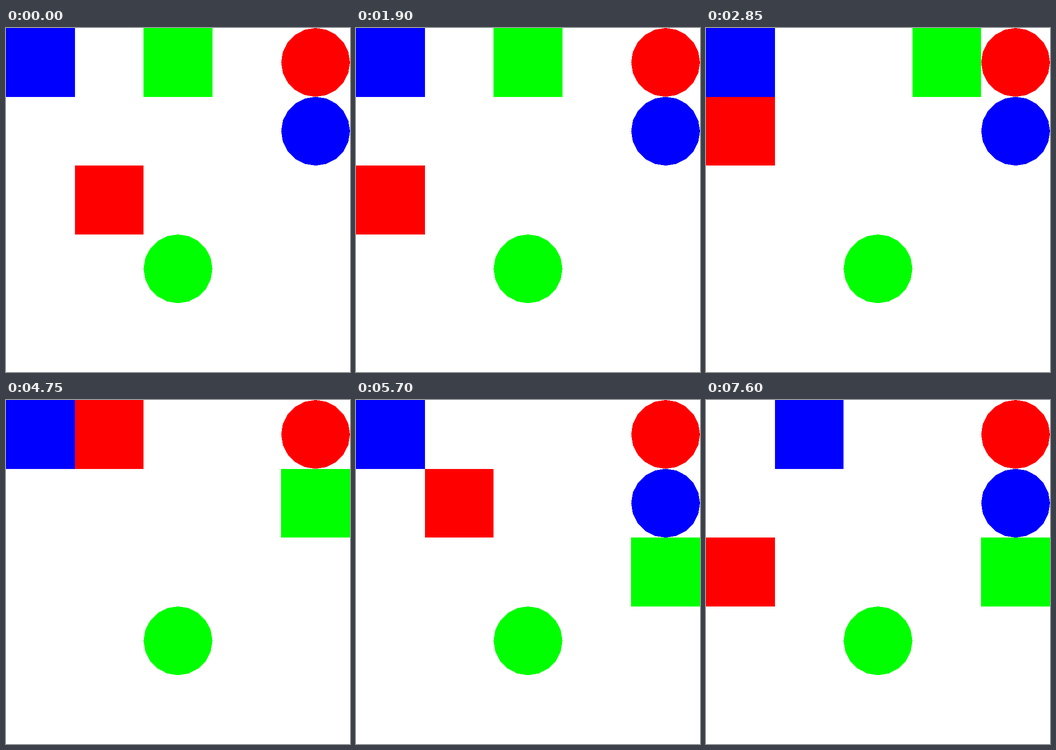
An HTML page for the animation above (8000 ms loop, 748 px wide and 748 px high).

```html
<!DOCTYPE html>
<html>
<head>
<meta charset="utf-8">
<style>
  html, body { margin: 0; width: 100%; height: 100%; overflow: hidden; background: #fff; }
  svg { display: block; width: 748px; height: 748px; shape-rendering: crispEdges; }
</style>
</head>
<body>
<svg id="stage" viewBox="0 0 748 748"></svg>
<script>
const CELL = 748 / 5, STEP = 950, LOOP = 8000;
const stage = document.getElementById('stage');

// Each goal: colour, column, row
const goals = [['#f00', 4, 0], ['#00f', 4, 1], ['#0f0', 2, 3]];

// Each agent: colour and its column-row cell at every step
const agents = [
  ['#f00', '12 02 02 01 11 10 11 01 02'],
  ['#0f0', '20 20 20 30 31 41 42 41 42'],
  ['#00f', '00 01 00 00 01 00 00 10 10'],
].map(([fill, path]) => ({ path: path.split(' '), node: add('rect', { fill, width: CELL, height: CELL }) }));

function add(tag, attributes) {
  const node = document.createElementNS('http://www.w3.org/2000/svg', tag);
  for (const name in attributes) node.setAttribute(name, attributes[name]);
  return stage.appendChild(node);
}

// Goals are 20-sided discs lying beneath the agents
for (const [fill, col, row] of goals) {
  const points = Array.from({ length: 20 }, (_, i) => {
    const angle = i * Math.PI / 10;
    return [(col + 0.5 + Math.cos(angle) / 2) * CELL, (row + 0.5 + Math.sin(angle) / 2) * CELL];
  });
  stage.prepend(add('polygon', { fill, points: points.join(' ') }));
}

const start = performance.now();
function draw() {
  const step = Math.floor((performance.now() - start) % LOOP / STEP);
  for (const { path, node } of agents) {
    const [col, row] = path[step];
    node.setAttribute('x', col * CELL);
    node.setAttribute('y', row * CELL);
  }
  requestAnimationFrame(draw);
}
draw();
</script>
</body>
</html>
```
